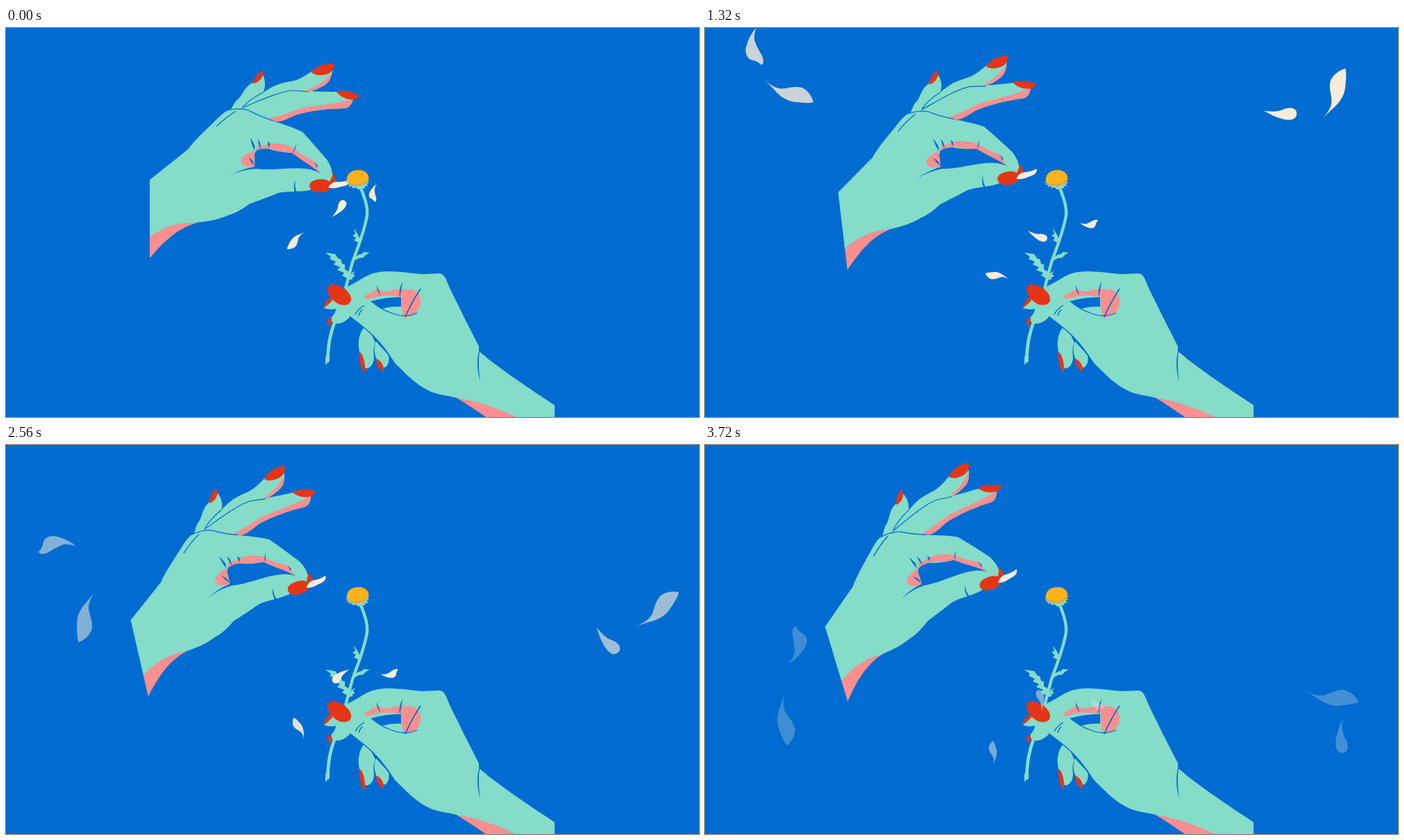
These frames come from a looping animation (998x561 px, 3760 ms). An HTML page with a canvas:

```html
<!DOCTYPE html>
<html lang="en">
<head>
<meta charset="utf-8">
<title>Daisy</title>
<style>
html, body { margin: 0; width: 100%; height: 100%; overflow: hidden; background: #006cd2; }
canvas { display: block; width: 998px; height: 561px; }
</style>
</head>
<body>
<canvas id="stage" width="998" height="561"></canvas>
<script>
const ctx = document.getElementById('stage').getContext('2d');
const BLUE = '#006cd2', SKIN = '#84dcc9', PINK = '#fa8f8f', RED = '#e53517', CREAM = '#f6ecdc';
const LOOP = 3760, STEP = 40, RAD = Math.PI / 180;

const fill = (color, d) => ({ color, path: new Path2D(d) });
const line = (color, width, d) => ({ color, width, path: new Path2D(d) });

function paint(parts) {
  for (const { color, width, path } of parts) {
    if (width) {
      ctx.strokeStyle = color;
      ctx.lineWidth = width;
      ctx.stroke(path);
    } else {
      ctx.fillStyle = color;
      ctx.fill(path);
    }
  }
}

const upperHand = [
  fill(RED, 'M468 207C473 211 476 217 475 222L466 224Z'),
  // fingers
  fill(SKIN, 'M323 118C328 112 329 106 335 102C341 96 343 86 353 80L370 68C374 76 374 86 370 93C363 101 352 103 345 112L338 117Z'),
  fill(SKIN, 'M338 115C352 104 362 98 375 90C390 80 400 79 415 76C428 72 434 66 442 62L470 62C468 74 464 79 458 83C447 89 440 92 430 91C410 90 385 97 342 114Z'),
  fill(PINK, 'M430 91C446 85 459 77 469 65C467 76 464 79 458 83C447 89 440 92 430 91Z'),
  fill(SKIN, 'M340 115C365 105 390 93 412 90C435 91 455 92 475 92L500 103C497 112 493 116 486 116C465 116 440 119 418 125C405 131 398 135 390 135L376 131Q355 122 340 117Z'),
  fill(PINK, 'M376 131C398 127 412 119 428 115C452 111 478 109 500 102C497 112 493 116 486 116C465 116 440 119 418 125C405 131 398 135 390 135Z'),
  // palm, index finger, thumb and wrist
  fill(SKIN, 'M207 219L262 175C272 161 290 145 302 133C310 125 316 119 324 118C335 115 343 117 350 120C362 126 372 130 385 134C400 139 415 144 427 150C440 164 452 178 463 191C468 200 470 206 470 213L466 222L437 234C420 237 403 235 392 238C375 245 360 250 350 254C340 262 328 268 320 270C302 278 288 279 272 281C250 280 230 286 207 301Z'),
  fill(PINK, 'M207 301C228 286 250 279 275 281C248 288 228 307 207 332Z'),
  fill(BLUE, 'M322 213Q340 204 360 203C385 206 410 200 433 203Q446 205 454 211L440 199Q425 190 412 180Q390 179 378 174Q367 173 360 177Q354 188 358 200Q340 203 322 213Z'),
  fill(PINK, 'M338 190C341 183 350 181 357 176Q359 188 358 199C349 202 339 200 338 190Z'),
  fill(PINK, 'M359 177L364 168Q372 170 379 166Q398 165 414 173Q431 187 446 193Q449 203 453 209L439 199Q425 190 412 180Q394 179 378 173Q368 173 359 177Z'),
  fill(BLUE, 'M349 186Q352 193 358 199L355 191Z'),
  fill(BLUE, 'M352 158Q353 167 358 177L358 169Z'),
  fill(BLUE, 'M363 160Q363 168 367 175L366 166Z'),
  fill(BLUE, 'M377 163Q377 169 379 173L380 167Z'),
  fill(BLUE, 'M418 167Q417 176 413 181Q415 174 418 167Z'),
  fill(BLUE, 'M445 193L449 199L447 201Z'),
  fill(BLUE, 'M417 219Q413 228 416 237L419 237Q415 229 417 219Z'),
  line(BLUE, 1.2, 'M322 118Q339 115 350 119Q365 127 385 134'),
  line(BLUE, 1.2, 'M340 115C365 105 390 93 412 90Q425 91 436 92'),
  line(BLUE, 1.2, 'M341 114Q349 104 370 93'),
  line(BLUE, 1.3, 'M303 142Q316 129 331 120'),
  // nails
  fill(RED, 'M355 80C358 72 363 63 370 62C372 70 364 80 355 80Z'),
  fill(RED, 'M440 64C447 55 460 50 473 52C472 60 468 66 460 67C452 69 445 68 440 64Z'),
  fill(RED, 'M475 91Q492 88 509 98Q505 104 495 103Q482 101 475 91Z'),
  fill(RED, 'M437 227C438 220 447 218 455 218C463 218 468 222 470 226C468 233 462 237 452 237C444 237 437 234 437 227Z'),
  fill(CREAM, 'M464 230C468 223 474 221 480 222Q488 222 495 219C495 226 489 228 482 229C476 231 470 232 464 230Z')
];

const flower = [
  line(SKIN, 4.4, 'M510 228C516 244 521 256 520 270C516 295 505 320 499 338C495 352 492 364 489 376'),
  line(SKIN, 4.8, 'M474 422C467 440 464 455 463 482'),
  fill(SKIN, 'M460 474L460 486L466 480L466 470Z'),
  fill(SKIN, 'M508 310L501 306L504 303L499 299L503 297L501 289L507 298L511 307Z'),
  fill(SKIN, 'M500 333Q508 325 513 326L515 323L524 324Q517 327 515 331L508 332L499 337Z'),
  fill(SKIN, 'M493 362L484 357L487 353L477 349L481 345L472 341L475 337L466 333L468 330L460 324L474 326L479 333L482 333L484 340L488 341L488 348L493 351Z'),
  fill(SKIN, 'M491 364L496 358L497 354L503 350L500 355L503 358L498 360L500 362Z'),
  fill(SKIN, 'M489 219L492 220L489 223L493 223L490 226L495 226L493 229L499 228L498 231L504 230L507 233L513 231L518 231L516 228L522 228L519 225L523 223L520 221L523 218L517 214Z'),
  fill('#e9a23e', 'M491 217C492 209 499 205 508 205C517 205 523 211 522 220C518 227 510 229 502 228C494 227 491 223 491 217Z'),
  fill('#f9b41c', 'M491 217C492 209 499 205 508 205C517 205 523 211 522 217C517 223 508 225 500 225C494 224 491 222 491 217Z')
];

const lowerHand = [
  fill(SKIN, 'M515 432C508 442 506 454 509 467C511 482 515 491 520 491C527 489 530 482 530 474Q528 462 532 454L526 441Z'),
  fill(SKIN, 'M533 452C529 461 530 471 535 480C539 489 543 491 547 489C552 484 552 478 551 472Z'),
  fill(SKIN, 'M469 390L458 404Q466 407 475 405Q475 411 468 418C467 426 476 428 484 425Q491 422 497 415L498 385Z'),
  fill(SKIN, 'M490 374C505 367 516 358 528 354C545 348 570 352 600 355L624 354Q630 354 634 363C640 379 650 396 658 414L682 461Q687 471 694 477C725 501 757 522 790 544L790 561L735 561L648 533C635 530 624 529 613 525C592 516 576 499 560 483C549 466 540 453 526 441C513 430 503 423 494 415L478 399Z'),
  fill(PINK, 'M648 533C680 538 706 548 735 561L691 561C676 551 662 541 648 533Z'),
  fill(PINK, 'M515 387C524 383 530 378 536 376Q543 381 552 379Q565 375 579 377Q594 376 597 390C598 401 594 409 586 414Q580 418 573 417Q569 407 570 388Q555 385 542 386Q530 388 520 391Z'),
  fill(BLUE, 'M526 394Q547 388 569 388L569 402Q556 402 542 405Q533 400 526 394Z'),
  fill(SKIN, 'M541 405Q555 401 570 402Q570 409 574 417Q555 413 541 405Z'),
  line(BLUE, 1.3, 'M526 394Q540 406 555 411Q574 419 592 411'),
  line(BLUE, 1.6, 'M597 376Q581 401 575 417'),
  fill(BLUE, 'M571 366Q565 378 567 388Q569 381 571 366Z'),
  fill(BLUE, 'M534 371Q533 379 540 386Q536 378 534 371Z'),
  line(BLUE, 1.4, 'M516 400Q507 405 503 413'),
  line(BLUE, 1.4, 'M513 406Q509 410 508 415'),
  line(BLUE, 1.4, 'M495 416Q514 430 527 442Q540 455 553 474'),
  fill(BLUE, 'M681 458L691 474L682 467Q679 484 683 510Q676 487 681 466Z'),
  fill(RED, 'M457 404Q459 394 468 388L470 393Q464 400 457 404Z'),
  fill(RED, 'M469 418Q470 426 465 430Q461 425 465 419Z'),
  fill(RED, 'M463 376C464 369 470 368 478 371C490 376 498 384 497 393C495 400 486 401 479 398C471 394 463 385 463 376Z'),
  fill(RED, 'M509 467C514 470 518 482 517 498C512 494 508 480 509 467Z'),
  fill(RED, 'M533 477C540 479 545 487 544 496C538 493 533 485 533 477Z')
];

// petal outlines, each with its tail pointing along +x
const leaf = new Path2D('M41.5 0C30 -4 18 -6 9 -2C0 3 -6 10 -17 12C-29 12 -37 5 -41.5 0C-36 -5 -26 -8 -18 -11C-8 -15 4 -14 14 -10C24 -6 32 -3 41.5 0Z');
const hook = new Path2D('M27 0C21 -8 13 -13 4 -17C-4 -22 -15 -20 -18 -13C-20 -7 -22 -4 -27 0C-25 5 -19 4 -14 3C-7 0 0 -3 9 -5C16 -5 22 -3 27 0Z');
const drop = new Path2D('M39 0C30 0 20 0 12 4.5C4 10 -5 10 -8 5C-11 -2 -7 -7 -2 -8C8 -11 24 -6 39 0Z');

// seconds at which the poses below are reached
const TIMES = [0, 0.6, 1.32, 2.08, 2.56, 3.04, 3.72];

// fade: [start in seconds, opacity lost per second]
const petals = [
  { shape: drop, size: 0.63, fade: [2.6, 0.45],
    x: [485, 487, 487, 479, 475, 474, 482],
    y: [254, 276, 303, 327, 338, 346, 359],
    turn: [130, 168, 206, 277, 324, 369, 442] },
  { shape: leaf, size: 0.46, fade: [2.3, 0.35],
    x: [419, 421, 422, 422.5, 422, 420, 414],
    y: [306, 330, 359, 390.5, 410.5, 427, 445.5],
    turn: [318, 343, 375.5, 405, 426.6, 441, 451.5] },
  { shape: hook, size: 0.48, fade: [2.6, 0.62],
    x: [532.5, 548, 553, 546.5, 552, 557.5, 566],
    y: [238, 255, 279.5, 309, 327, 344.5, 371],
    turn: [276.6, 231, 173.4, 148.7, 167, 191, 225] },
  { shape: leaf, size: 0.98, fade: [0.55, 0.235],
    x: [119, 119, 119.5, 118, 118, 117.5, 117.5],
    y: [-76, 0, 89.5, 186, 246, 306, 393],
    turn: [95, 141, 205.6, 257, 289, 321.5, 269] },
  { shape: hook, size: 1, fade: [0.55, 0.235],
    x: [110, 95, 77.5, 63, 73.5, 97, 126],
    y: [-110, -48, 26.5, 90.5, 150, 206, 288],
    turn: [200, 225, 262.5, 308, 351, 396, 460.5] },
  { shape: drop, size: 1, fade: [1.45, 0.32],
    x: [895, 869, 843, 848, 875, 902, 917],
    y: [-72, 21, 124, 235, 293, 352, 435],
    turn: [140, 160, 187, 219, 231, 249, 271] },
  { shape: leaf, size: 1, fade: [1.45, 0.32],
    x: [860, 882, 904.5, 927.5, 936, 928, 901],
    y: [-58, 15, 96, 182, 237.5, 290, 361],
    turn: [95, 104, 115.3, 132.5, 142.6, 164.6, 193] }
];

function slope(values, i) {
  const a = Math.max(i - 1, 0), b = Math.min(i + 1, TIMES.length - 1);
  return (values[b] - values[a]) / (TIMES[b] - TIMES[a]);
}

// cubic Hermite curve through the values
function glide(values, t) {
  let i = 0;
  while (i < TIMES.length - 2 && t >= TIMES[i + 1]) i++;
  const span = TIMES[i + 1] - TIMES[i];
  const u = (t - TIMES[i]) / span, v = 1 - u;
  return values[i] * v * v * (1 + 2 * u) + values[i + 1] * u * u * (3 - 2 * u)
    + span * u * v * (slope(values, i) * v - slope(values, i + 1) * u);
}

function drawPetal({ shape, size, fade, x, y, turn }, t) {
  ctx.save();
  ctx.translate(glide(x, t), glide(y, t));
  ctx.rotate(glide(turn, t) * RAD);
  ctx.scale(size, size);
  ctx.globalAlpha = Math.min(1, 1 - (t - fade[0]) * fade[1]);
  ctx.fillStyle = CREAM;
  ctx.fill(shape);
  ctx.restore();
}

function drawUpperHand(t) {
  const end = 16.73;
  const angle = Math.min(end, 5.2 * t - 0.06 * t * t);
  ctx.save();
  ctx.translate(336.3, 356.2 + 1.8 * Math.sin(Math.PI * angle / end));
  ctx.rotate(-angle * RAD);
  ctx.translate(-336.3, -356.2);
  paint(upperHand);
  ctx.restore();
}

function draw(t) {
  ctx.fillStyle = BLUE;
  ctx.fillRect(0, 0, 998, 561);
  drawUpperHand(t);
  paint(flower);
  paint(lowerHand);
  for (const petal of petals) drawPetal(petal, t);
}

const start = performance.now();
function tick() {
  const elapsed = (performance.now() - start) % LOOP;
  draw(Math.floor(elapsed / STEP) * STEP / 1000);
  requestAnimationFrame(tick);
}
tick();
</script>
</body>
</html>
```
